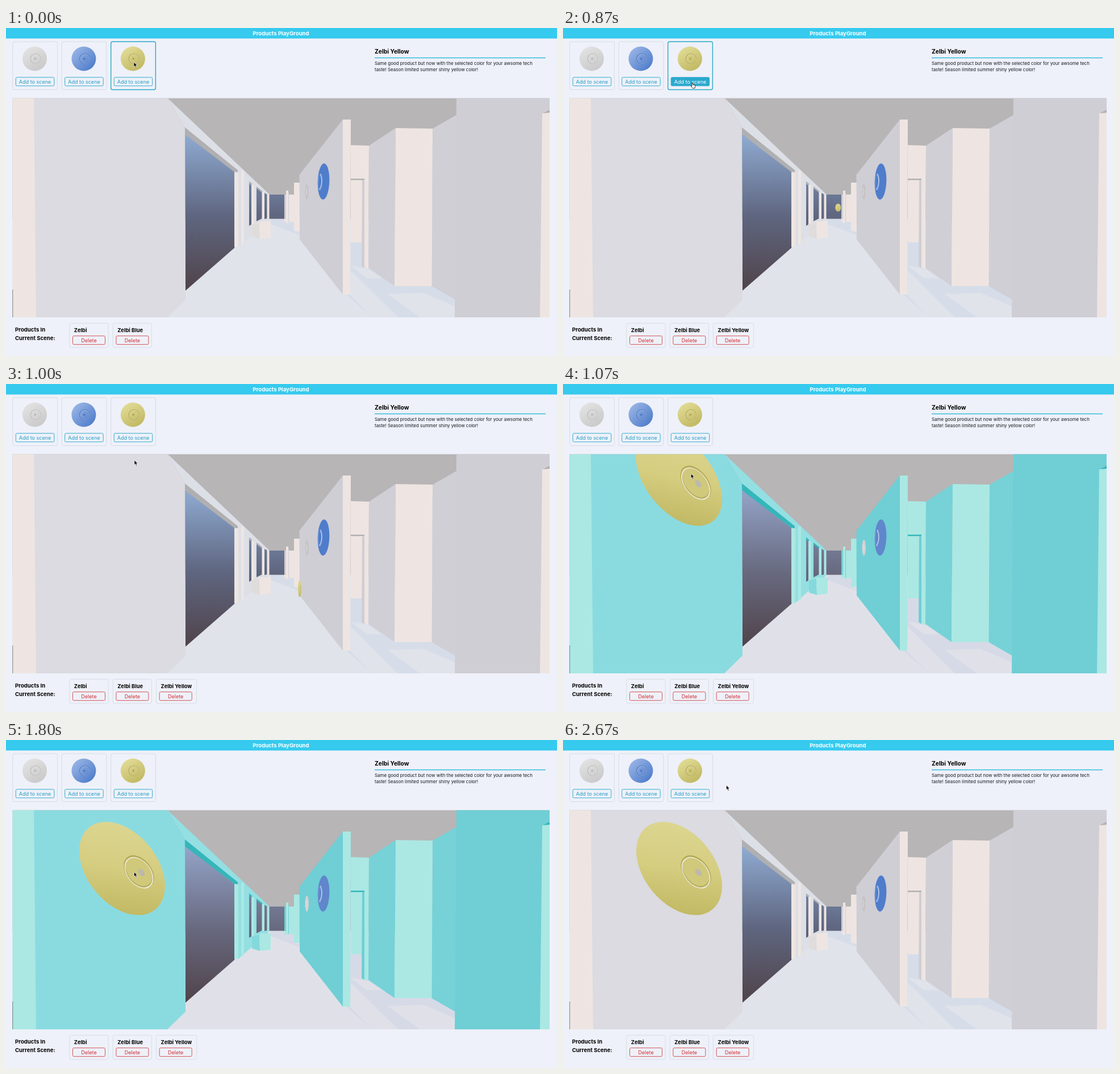
Write an HTML page that moves like this. It is 970x577 px and loops after 2740 ms.

```html
<!DOCTYPE html>
<html lang="en">
<head>
<meta charset="utf-8">
<title>Products PlayGround</title>
<style>
  html, body { margin: 0; height: 100%; overflow: hidden; background: #eef1f9; }
  svg {
    display: block; font: 9.05px Inter, sans-serif;
    --trim: #eee5e2; --left: #dbdbe1; --band: #dcdfe5; --right: #cfced5; --side: #d0cfd6;
    --soffit: #b0afb1; --floor: #e0e3ea; --shade: #d6dde9; --sky: #8fabd2; --mid: #5f6680;
    --bench: #dfdcdb; --blue: #4f7dcb; --pearl: #c6c4c6;
  }
  svg.hot {
    --trim: #abe8e3; --left: #8adbe0; --band: #93dfe2; --right: #70ced5; --side: #76d2d7;
    --soffit: #35b6ba; --floor: #e0e1e8; --shade: #d6dae6; --sky: #94a4c8; --mid: #686a80;
    --bench: #84d9dc; --blue: #6086cb; --pearl: #d5d1d4;
  }
  .trim { fill: var(--trim); } .left { fill: var(--left); } .band { fill: var(--band); }
  .right { fill: var(--right); } .side { fill: var(--side); } .soffit { fill: var(--soffit); }
  .floor { fill: var(--floor); } .shade { fill: var(--shade); } .glass { fill: url(#glass); }
  .bench { fill: var(--bench); }
  .bold { font-weight: 700; font-size: 9.6px; }
  .mid { text-anchor: middle; }
  .card rect { fill: none; stroke: #d7dbe2; }
  .card .button { stroke: #35abcd; }
  .card text { fill: #299fc4; }
  .card.on .frame { stroke: #2ba9c6; stroke-width: 1.4; }
  .card.press .button { fill: #2aa9ce; }
  .card.press text { fill: #fff; }
  .item rect { fill: none; stroke: #d9dde4; }
  .item .button { stroke: #d45358; }
  .item .mid { fill: #d32f36; }
</style>
</head>
<body>
<svg id="stage" width="970" height="577" viewBox="0 0 970 577">
  <defs>
    <linearGradient id="glass" gradientUnits="userSpaceOnUse" x1="0" y1="187" x2="0" y2="462">
      <stop offset="0" style="stop-color:var(--sky)"/>
      <stop offset=".52" style="stop-color:var(--mid)"/>
      <stop offset="1" stop-color="#50434a"/>
    </linearGradient>
    <linearGradient id="pearl" x1=".2" y1="0" x2=".8" y2="1">
      <stop stop-color="#e4e3e3"/><stop offset="1" stop-color="#c9c8c8"/>
    </linearGradient>
    <linearGradient id="azure" x1=".1" y1=".1" x2=".9" y2=".9">
      <stop stop-color="#9ab5e6"/><stop offset="1" stop-color="#4e7cca"/>
    </linearGradient>
    <linearGradient id="lemon" x1=".2" y1="0" x2=".8" y2="1">
      <stop stop-color="#e3dd98"/><stop offset="1" stop-color="#bfb65f"/>
    </linearGradient>
    <linearGradient id="shell" x1=".3" y1="0" x2=".6" y2="1">
      <stop stop-color="#dcd691"/><stop offset=".5" stop-color="#d5cd80"/><stop offset="1" stop-color="#c2b964"/>
    </linearGradient>
    <clipPath id="view"><rect x="11.5" y="123.5" width="945.5" height="385.5"/></clipPath>
  </defs>

  <rect width="970" height="18.5" fill="#36caee"/>
  <text class="bold mid" x="484" y="12.7" fill="#fff">Products PlayGround</text>
  <g id="cards"></g>
  <text class="bold" x="649" y="45" style="font-size:10.3px">Zelbi Yellow</text>
  <path d="M649 52.5H950" stroke="#35bdd9" stroke-width="1.3"/>
  <g style="font-size:7.95px" fill="#16181c">
    <text x="649" y="64.5">Same good product but now with the selected color for your awsome tech</text>
    <text x="649" y="76.3">taste! Season limited summer shiny yellow color!</text>
  </g>

  <g clip-path="url(#view)">
    <path fill="#b7b5b6" d="M11 123H957V336H11z"/>
    <path class="floor" d="M11 336H957V509H11z"/>
    <path class="shade" d="M466 336H508V357L517 360V364L466 345z"/>
    <!-- left side of the corridor -->
    <path class="band" d="M284 123L463 292V337L409 385H403V253L315 175z"/>
    <path class="soffit" d="M315 175L408 250V254H403L315 188z"/>
    <path class="glass" d="M315 187L403 254V386L316 462z"/>
    <path class="left" d="M49 123H284L315 175L316 478L284 509H49z"/>
    <path class="trim" d="M11 123H49L53 509H11zM402 253L409 254V384L402 386zM414 250L419 251V379L414 381z"/>
    <path fill="#55575d" d="M11 460H12.2V509H11z"/>
    <path class="glass" d="M428 270L433 274V345L428 348zM441 279L451 287V335L441 340zM455 290L460 293V335L455 336zM463 293H490V335.5H463z"/>
    <path class="soffit" d="M428 270L433 274V278L428 274zM441 279L451 287V290L441 282z"/>
    <path class="trim" d="M432 276L437 277V345L432 347zM450.500 289H455V336H450.500zM459.500 293H463.500V336H459.500z"/>
    <path class="bench" d="M433 345L446 342L447 371L433 367z"/>
    <path class="trim" d="M446 342L466 340V369L447 371zM433 345L450 340H466L446 342z"/>
    <!-- right side -->
    <path class="trim" d="M490 293H507V341H490z"/>
    <path class="right" d="M490 293H493V336H490zM496 290H498V341H496z"/>
    <path class="trim" d="M493 286H497V343H493zM507 272H517V357H507z"/>
    <path class="shade" d="M606 376H640L791 478V509H645L600 470z"/>
    <path class="floor" d="M672 468L735 466L791 490V509H729zM607 418L638 424L661 440H635zM607 427L690 509H645L606 470z"/>
    <path class="right" d="M516.500 258L593 161V469L517 372z"/>
    <path class="trim" d="M607 206L639 207L638 424L631 421V377H607z"/>
    <path class="soffit" d="M607 265H631V267.500H607z"/>
    <path class="right" d="M627 267H631V422L626 419z"/>
    <path class="trim" d="M593 161H607L606 469H593z"/>
    <path class="side" d="M639 207L686 176L684 454L638 422zM751 177L793 153L791 478L749 454z"/>
    <path class="trim" d="M686 176L751 177L749.500 454H684z"/>
    <path class="right" d="M793 123H957V509H790z"/>
    <path class="soffit" d="M945 150L957 144V150z"/>
    <path class="trim" d="M944 150L957 149V509H940z"/>
    <!-- mounted products -->
    <ellipse cx="529.700" cy="288" rx="3.200" ry="14" style="fill:var(--pearl)"/>
    <path d="M528.500 282Q531 288 528.500 294" fill="none" stroke="#e8e6e6" stroke-width=".8"/>
    <g transform="rotate(2 559 270)">
      <ellipse cx="559" cy="270" rx="10.300" ry="31.700" style="fill:var(--blue)"/>
      <ellipse cx="553" cy="271" rx="3.600" ry="14.500" fill="none" stroke="#7fa3e0" stroke-width=".8"/>
      <path d="M553 257Q559 271 552.500 285" fill="none" stroke="#cfdcf4" stroke-width="1.200"/>
    </g>
    <g id="disc">
      <circle r="1" fill="url(#shell)"/>
      <circle cx=".39" cy="-.08" r=".33" fill="none" stroke="#b2a951" stroke-width=".05"/>
      <circle cx=".39" cy="-.06" r=".325" fill="none" stroke="#e8e5cf" stroke-width=".028"/>
      <circle cx=".39" cy="-.08" r=".3" fill="#d0c87a"/>
      <circle cx=".45" cy="-.09" r=".075" fill="#bdb9ac"/>
    </g>
  </g>

  <text class="bold" x="16" y="534.300">Products In</text>
  <text class="bold" x="16" y="548.500">Current Scene:</text>
  <g id="items"></g>
  <path id="arrow" d="M0 0V8.300L1.900 6.600L3.300 9.900L4.700 9.300L3.300 6.100H5.900z" stroke="#fff" stroke-width=".7"/>
  <path id="hand" d="M0 0Q1.200 -.8 1.500 .6L2 3.300L4.800 3.900Q6 4.300 5.700 6L5 9.500H1.300L-1.600 6Q-1.400 4.800 0 5.800z" fill="#fff" stroke="#111" stroke-width=".8"/>
</svg>
<script>
const $ = id => document.getElementById(id);
const LOOP = 2740, FPS = 15;
const ADDED = 11, DROPPED = 16;

const box = (cls, x, y, w, h, r) =>
  `<rect class="${cls}" x="${x}" y="${y}" width="${w}" height="${h}" rx="${r}"/>`;

const card = (x, paint, groove) => `<g class="card">
  ${box('frame', x, 24, 78.7, 84.5, 3)}
  <circle cx="${x + 38.7}" cy="54" r="21.5" fill="url(#${paint})"/>
  <circle cx="${x + 40.5}" cy="54" r="8.8" fill="none" stroke="${groove}" stroke-width="1.1"/>
  <circle cx="${x + 41}" cy="54.4" r="8.2" fill="none" stroke="#fff" stroke-opacity=".45" stroke-width=".7"/>
  <circle cx="${x + 39.5}" cy="54" r="1.8" fill="${groove}"/>
  ${box('button', x + 5.5, 86.8, 67.5, 15, 2)}
  <text class="mid" x="${x + 39.3}" y="97.8">Add to scene</text></g>`;

const item = (x, name, w) => `<g class="item">
  ${box('frame', x, 519.3, w, 42.7, 3)}
  <text class="bold" x="${x + 8}" y="535.3" style="font-size:9.3px">${name}</text>
  ${box('button', x + 5.7, 541.7, 57, 15, 2)}
  <text class="mid" x="${x + 34.2}" y="552.5">Delete</text></g>`;

$('cards').innerHTML = card(11.8, 'pearl', '#b5b3b3') + card(98.2, 'azure', '#4a73bb') + card(184.7, 'lemon', '#aaa150');
$('items').innerHTML = item(111.8, 'Zelbi', 68.3) + item(188.2, 'Zelbi Blue', 68.3) + item(264.5, 'Zelbi Yellow', 71);
const yellowCard = $('cards').lastElementChild, yellowItem = $('items').lastElementChild;

// Keys: [frame, ...values]
const cursorKeys = [[0, 225, 60], [2, 225, 62], [8, 227, 96], [13, 227, 96.5], [15, 226, 134],
  [19, 223, 229], [22, 225, 232.5], [34, 226, 231.5], [36, 236, 200], [40, 287.5, 79.5]];
// Disc values: half width, shear, half height, centre
const discKeys = [[16, 76, 38, 75.5, 204, 165], [19, 76, 36, 75.5, 204, 212.5], [22, 75.5, 31, 76, 204.5, 226]];

function sample(keys, f) {
  const i = keys.findIndex(k => k[0] > f);
  if (i < 1) return keys.at(i).slice(1);
  const a = keys[i - 1], b = keys[i], p = (f - a[0]) / (b[0] - a[0]);
  return a.slice(1).map((v, j) => v + (b[j + 1] - v) * p);
}

function discPose(f) {
  if (f < 15) return [5, 0, 7, 484.3, 316];
  if (f < DROPPED) return [3, 0, 15, 517, 360];
  return sample(discKeys, f);
}

const show = (el, on) => el.style.display = on ? '' : 'none';

function draw() {
  const f = Math.floor((performance.now() % LOOP + 4) * FPS / 1000);
  const [x, y] = sample(cursorKeys, f);
  const onCard = x < 264 && y < 109;
  const onButton = onCard && y > 86.5 && y < 102;
  const [w, shear, h, cx, cy] = discPose(f);

  yellowCard.classList.toggle('on', onCard);
  yellowCard.classList.toggle('press', onButton);
  $('stage').classList.toggle('hot', f >= DROPPED && y > 123.5);
  show(yellowItem, f >= ADDED);
  show($('disc'), f >= ADDED);
  $('disc').setAttribute('transform', `matrix(${w} ${shear} 0 ${h} ${cx} ${cy})`);
  for (const id of ['arrow', 'hand']) {
    show($(id), (id === 'hand') === onButton);
    $(id).setAttribute('transform', `translate(${x} ${y})`);
  }
  requestAnimationFrame(draw);
}
draw();
</script>
</body>
</html>
```
